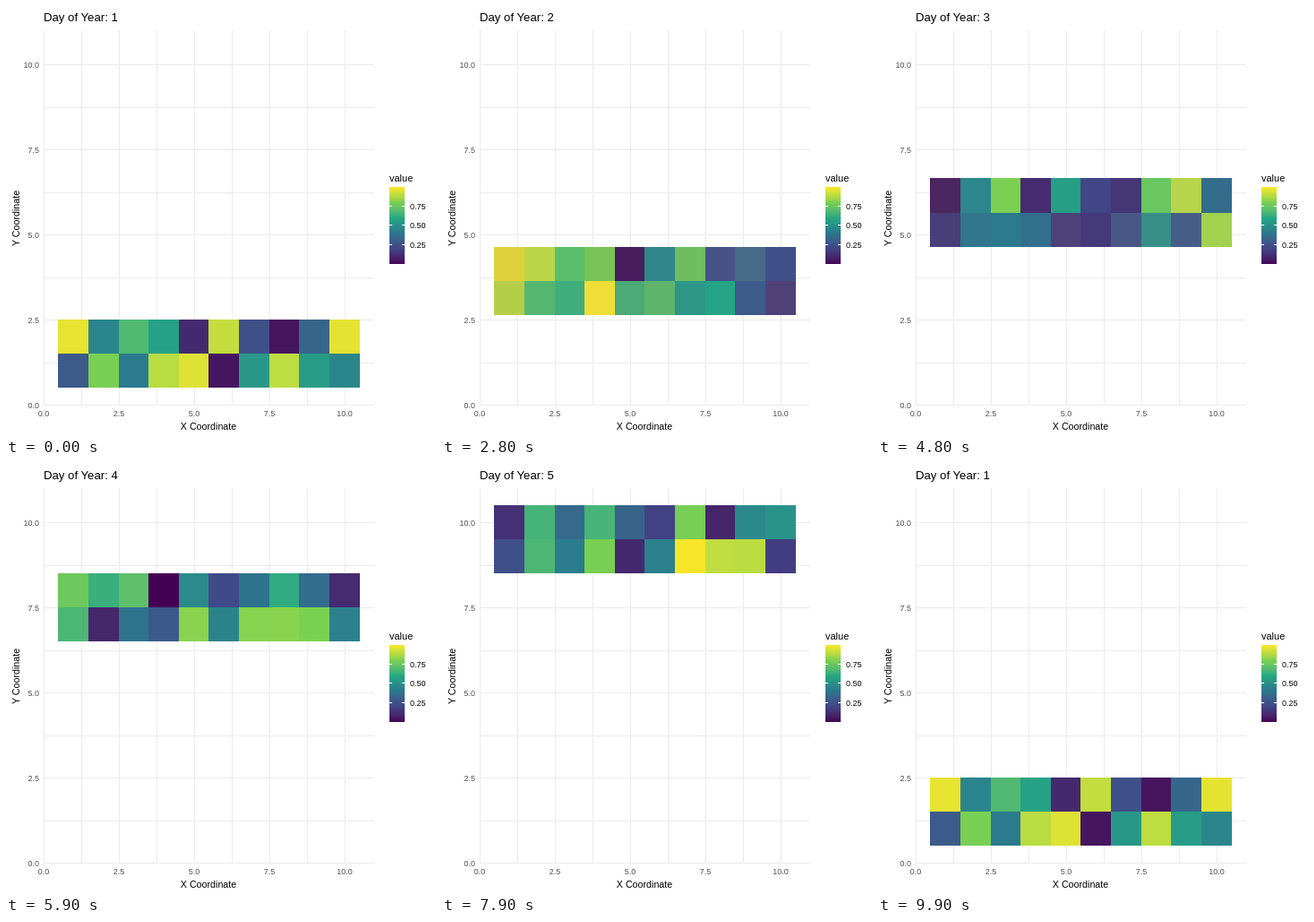
Animation of 480 by 480 pixels, one loop 10 s. Source, as an HTML page:

```html
<!DOCTYPE html>
<html lang="en">
<head>
<meta charset="utf-8">
<title>Day of Year</title>
<style>
  html, body { margin: 0; width: 100%; height: 100%; overflow: hidden; background: #fff; }
  svg { display: block; width: 480px; height: 480px; font-family: "Liberation Sans", Arial, sans-serif; }
  rect { shape-rendering: crispEdges; }
</style>
</head>
<body>
<svg id="plot" viewBox="0 0 480 480"></svg>
<script>
const svg = document.getElementById("plot");
const palette = ["#440154", "#414487", "#2a788e", "#22a884", "#7ad151", "#fde725"];
// Steps of 100 ms at which each move to the next day begins and ends.
const moves = [[6, 20], [27, 40], [47.1, 58.9], [66, 79], [86, 99]];

// Uniform numbers from a Mersenne Twister; count must stay below 227.
function randoms(seed, count) {
  const next = () => seed = Math.imul(69069, seed) + 1 | 0;
  for (let i = 0; i < 51; i++) next();
  const mt = Array.from({ length: 624 }, next);
  return Array.from({ length: count }, (_, i) => {
    const mixed = (mt[i] & 0x80000000) | (mt[i + 1] & 0x7fffffff);
    let y = mt[i + 397] ^ (mixed >>> 1) ^ (mixed & 1 ? 0x9908b0df : 0);
    y ^= y >>> 11;
    y ^= (y << 7) & 0x9d2c5680;
    y ^= (y << 15) & 0xefc60000;
    y ^= y >>> 18;
    return (y >>> 0) / 2 ** 32;
  });
}

// Twenty values per day: lower row, then upper row.
const values = randoms(123, 100);
const low = Math.min(...values), high = Math.max(...values);
const scale = v => (v - low) / (high - low);

const px = x => Math.round(41.5 + 33.63 * x);
const py = y => Math.round(445.495 - 38.03 * y);
const mix = (a, b, p) => `color-mix(in lab, ${a}, ${b} ${(p * 100).toFixed(2)}%)`;

function viridis(t) {
  const i = Math.min(4, Math.floor(t * 5));
  return mix(palette[i], palette[i + 1], t * 5 - i);
}

const tileColor = (day, i) => viridis(scale(values[day * 20 + i]));

function add(name, attrs, text = "") {
  const el = document.createElementNS("http://www.w3.org/2000/svg", name);
  for (const key in attrs) el.setAttribute(key, attrs[key]);
  el.textContent = text;
  return svg.appendChild(el);
}

function rect(x, y, width, height, fill) {
  const el = add("rect", { x, y, width, height });
  el.style.fill = fill;
  return el;
}

function label(text, x, y, size, anchor = "start", fill = "#000", more = {}) {
  return add("text", { x, y, "font-size": size, "text-anchor": anchor, fill, ...more }, text);
}

// Grid and axes
for (let v = 0; v <= 10; v += 1.25) {
  rect(px(v), 27, 1, 419, "#ebebeb");
  rect(42, py(v), 369, 1, "#ebebeb");
  if (v % 2.5 === 0) {
    label(v.toFixed(1), px(v), 458, 9, "middle", "#4d4d4d");
    label(v.toFixed(1), 37, py(v) + 4, 9, "end", "#4d4d4d");
  }
}
label("X Coordinate", 226, 473, 10.7, "middle");
label("Y Coordinate", 0, 0, 10.7, "middle", "#000", { transform: "translate(15 237) rotate(-90)" });
const title = label("", 42, 17, 13.2);

// Legend
label("value", 428, 196, 11);
for (let i = 0; i < 86; i++) rect(428, 202 + i, 17, 1, viridis(1 - (i + 0.5) / 86));
for (const v of [0.25, 0.5, 0.75]) {
  const y = Math.floor(288.2 - 86.4 * scale(v));
  rect(428, y, 3, 1, "#fff");
  rect(442, y, 3, 1, "#fff");
  label(v.toFixed(2), 451, y + 4, 9);
}

const tiles = Array.from({ length: 20 }, (_, i) => {
  const x = i % 10 + 0.5;
  return rect(px(x), 0, px(x + 1) - px(x), 38, "none");
});

function draw(step) {
  let from = 0, p = 0;
  moves.forEach(([start, end], i) => {
    if (step >= start) {
      from = i;
      p = Math.min(1, (step - start) / (end - start));
    }
  });
  const to = (from + 1) % 5;
  const base = 0.5 + 2 * (from + (to - from) * p);
  title.textContent = "Day of Year: " + ((p < 0.5 ? from : to) + 1);
  tiles.forEach((tile, i) => {
    const y = base + Math.floor(i / 10);
    tile.setAttribute("y", py(y + 1));
    tile.setAttribute("height", py(y) - py(y + 1));
    tile.style.fill = mix(tileColor(from, i), tileColor(to, i), p);
  });
}

let shown = -1;
function tick() {
  const step = Math.floor(performance.now() / 100) % 100;
  if (step !== shown) draw(shown = step);
  requestAnimationFrame(tick);
}
tick();
</script>
</body>
</html>
```
